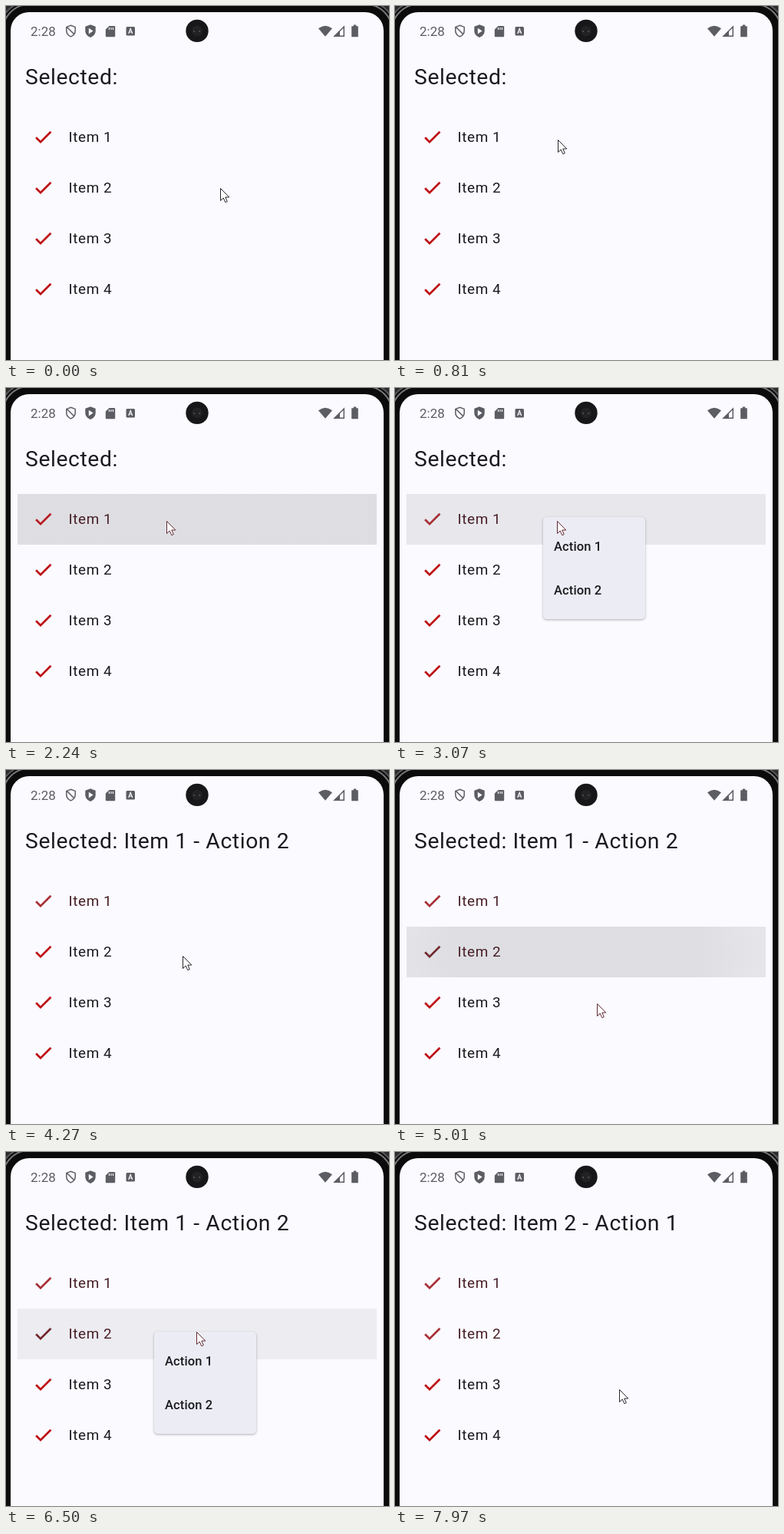
Write an HTML page that moves like this. It is 499 px wide and 461 px high and loops after 8000 ms.

```html
<!DOCTYPE html>
<html lang="en">
<head>
<meta charset="utf-8">
<title>Context menu</title>
<style>
html, body { margin: 0; width: 100%; height: 100%; overflow: hidden; background: #0b0b0c; }
svg { display: block; width: 499px; height: 461px; font-family: Roboto, sans-serif; }
text { fill: #1b1b1f; white-space: pre; }
.title { font-size: 28.3px; letter-spacing: .59px; }
.item { font-size: 18.86px; letter-spacing: .6px; }
.action { font-size: 16.5px; font-weight: 500; letter-spacing: .12px; }
.clock { font-size: 17px; fill: #5c5d63; }
#menu { filter: drop-shadow(0 1px 1.5px rgba(0, 0, 0, .3)); }
</style>
</head>
<body>
<svg viewBox="0 0 499 461">
  <defs>
    <radialGradient id="soft" gradientUnits="userSpaceOnUse">
      <stop id="inner" offset="0"/>
      <stop offset="1" stop-opacity="0"/>
    </radialGradient>
  </defs>

  <rect width="499" height="461" fill="#2c2c2d"/>
  <g fill="#0b0b0c" stroke-width="2">
    <rect x="-8" y="-6" width="515" height="600" rx="38" stroke="#5a5a5c"/>
    <rect x="-4" y="-2" width="507" height="600" rx="34" stroke="#777779"/>
  </g>
  <rect x="6" y="8" width="486" height="500" rx="24" fill="#fafaff"/>

  <text class="clock" x="32" y="39">2:28</text>
  <g fill="#5c5d63">
    <path d="M84.500 25.300l5.700 2.100v4.800c0 3.800-2.400 6.200-5.700 7.700-3.300-1.500-5.700-3.900-5.700-7.700v-4.800zM79.500 27.500l9.500 9.500" fill="none" stroke="#5c5d63" stroke-width="1.500"/>
    <path d="M110 24.300l6.700 2.500v5.400c0 4.200-2.800 7.200-6.700 8.700-3.900-1.500-6.700-4.500-6.700-8.700v-5.400z"/>
    <path d="M107.800 28.800v7.600l5.800-3.800z" fill="#fafaff"/>
    <path d="M134.500 26H141q1.200 0 1.200 1.200V39q0 1.200-1.200 1.200H131q-1.200 0-1.200-1.200V30.500z"/>
    <path d="M134.500 28v3M137 28v3M139.500 28v3" stroke="#fafaff" stroke-width="1.100"/>
    <rect x="156.500" y="27" width="11.500" height="11.500" rx="1.500"/>
    <path d="M159.700 36l2.500-6.500 2.500 6.500M160.600 34h3.200" fill="none" stroke="#fafaff" stroke-width="1.200"/>
    <path d="M407 29.300q9-7 18 0L416 39.700z"/>
    <path d="M440.300 27v12.300H428z" fill="none" stroke="#5c5d63" stroke-width="1.500"/>
    <path d="M435 32.500V39.500H428z"/>
    <path d="M452.800 24.500h3.500v1.700h2.500V40.300h-8.600V26.200h2.600z"/>
  </g>
  <circle cx="249" cy="32.400" r="14.700" fill="#171719"/>
  <circle cx="249" cy="32.400" r="7" fill="#222225"/>
  <path d="M244.500 33h1.500M251.500 33h1.500" stroke="#66666c" stroke-width="1.500"/>

  <text class="title" id="title" x="25" y="102"></text>
  <rect id="ripple" x="15" width="468" height="66" fill="url(#soft)"/>
  <g id="list"></g>
  <g id="menu">
    <rect width="133" height="133" rx="4.700" fill="#ececf4"/>
    <text class="action" x="14" y="44">Action 1</text>
    <text class="action" x="14" y="100.500">Action 2</text>
  </g>
  <path id="cursor" d="M.5 .5V16.500l3.700-3.500 2.600 5.700 2.500-1.100-2.500-5.600H11.800z" fill="#fff" stroke-width="1"/>
</svg>
<script>
const LOOP = 8000;
const $ = id => document.getElementById(id);
const set = (el, attrs) => { for (const k in attrs) el.setAttribute(k, attrs[k]); };
const clamp = v => Math.max(0, Math.min(1, v));
const smooth = p => p * p * (3 - 2 * p);
const rowY = i => 138 + 66 * i;

// Each visit: when the ripple shows, when the menu opens, when an action is picked.
const visits = [
  { row: 0, press: 1290, open: 2930, pick: 3870, cx: 230, result: "Item 1 - Action 2" },
  { row: 1, press: 4830, open: 6290, pick: 7160, cx: 235, result: "Item 2 - Action 1" }
];

// Pointer stops: time, x, y
const stops = [
  [110, 279, 237], [880, 210, 173], [950, 206, 168], [1020, 197, 161], [1090, 209, 173],
  [2930, 209, 173], [3000, 211, 173], [3100, 211, 173], [3730, 218, 254],
  [4200, 218, 254], [4270, 230, 242], [4470, 240, 231], [4610, 240, 231],
  [5010, 263, 304], [5080, 265, 315], [5360, 246, 224], [5480, 234, 219],
  [5620, 234, 219], [5800, 248, 234], [6560, 248, 234], [7100, 260, 248],
  [7430, 260, 248], [7970, 292, 309]
];

const rows = [0, 1, 2, 3].map(i => {
  const g = document.createElementNS("http://www.w3.org/2000/svg", "g");
  g.innerHTML = `<path transform="translate(34.400 ${rowY(i) + 18.4}) scale(1.180)" stroke-width=".350"
    d="M9 16.170L4.830 12l-1.420 1.410L9 19 21 7l-1.410-1.410z"/>
    <text class="item" x="81.600" y="${rowY(i) + 39}">Item ${i + 1}</text>`;
  $("list").append(g);
  return { check: g.firstElementChild, label: g.lastElementChild };
});

function pointer(t) {
  const n = stops.findIndex(s => s[0] > t);
  if (n === 0) return stops[0].slice(1);
  if (n < 0) return stops[stops.length - 1].slice(1);
  const [t0, x0, y0] = stops[n - 1], [t1, x1, y1] = stops[n];
  const p = smooth((t - t0) / (t1 - t0));
  return [Math.round(x0 + (x1 - x0) * p), Math.round(y0 + (y1 - y0) * p)];
}

function drawRipple(t, v) {
  const age = t - v.press;
  const inner = 90 + .35 * age, outer = 222 + 1.6 * age;
  set($("soft"), { cx: v.cx, cy: rowY(v.row) + 33, r: outer });
  set($("inner"), { offset: inner / outer });
  set($("ripple"), { y: rowY(v.row), opacity: age < 0 ? 0 : .113 * clamp(1 - (t - v.open) / 420) });
}

function drawMenu(t, v) {
  const scale = .8 + .2 * smooth(clamp((t - v.open) / 120));
  const alpha = Math.min(clamp((t - v.open) / 30), clamp(1 - (t - v.pick) / 75));
  set($("menu"), {
    transform: `translate(193 ${rowY(v.row) + 30}) scale(${scale})`,
    opacity: alpha,
    visibility: alpha > 0 ? "visible" : "hidden"
  });
}

function draw(t) {
  const v = visits[t < 4500 ? 0 : 1];
  const picked = visits.filter(o => t >= o.pick).pop();
  $("title").textContent = "Selected:" + (picked ? " " + picked.result : "");
  drawRipple(t, v);
  drawMenu(t, v);

  rows.forEach((r, i) => {
    const own = visits.find(o => o.row === i);
    const touched = own && t >= own.press;
    let check = "#bd0a10";
    if (touched) check = i === 1 && t < own.pick ? "#70262b" : t < own.open ? "#b8181f" : "#a62c32";
    set(r.check, { fill: check, stroke: check });
    r.label.style.fill = touched ? "#471f25" : "#1b1b1f";
  });

  const [x, y] = pointer(t);
  const active = t >= v.press && t < v.open + 420;
  set($("cursor"), { transform: `translate(${x} ${y})`, stroke: active ? "#632a34" : "#26262a" });
}

const start = performance.now();
function tick() {
  draw((performance.now() - start) % LOOP);
  requestAnimationFrame(tick);
}
tick();
</script>
</body>
</html>
```
